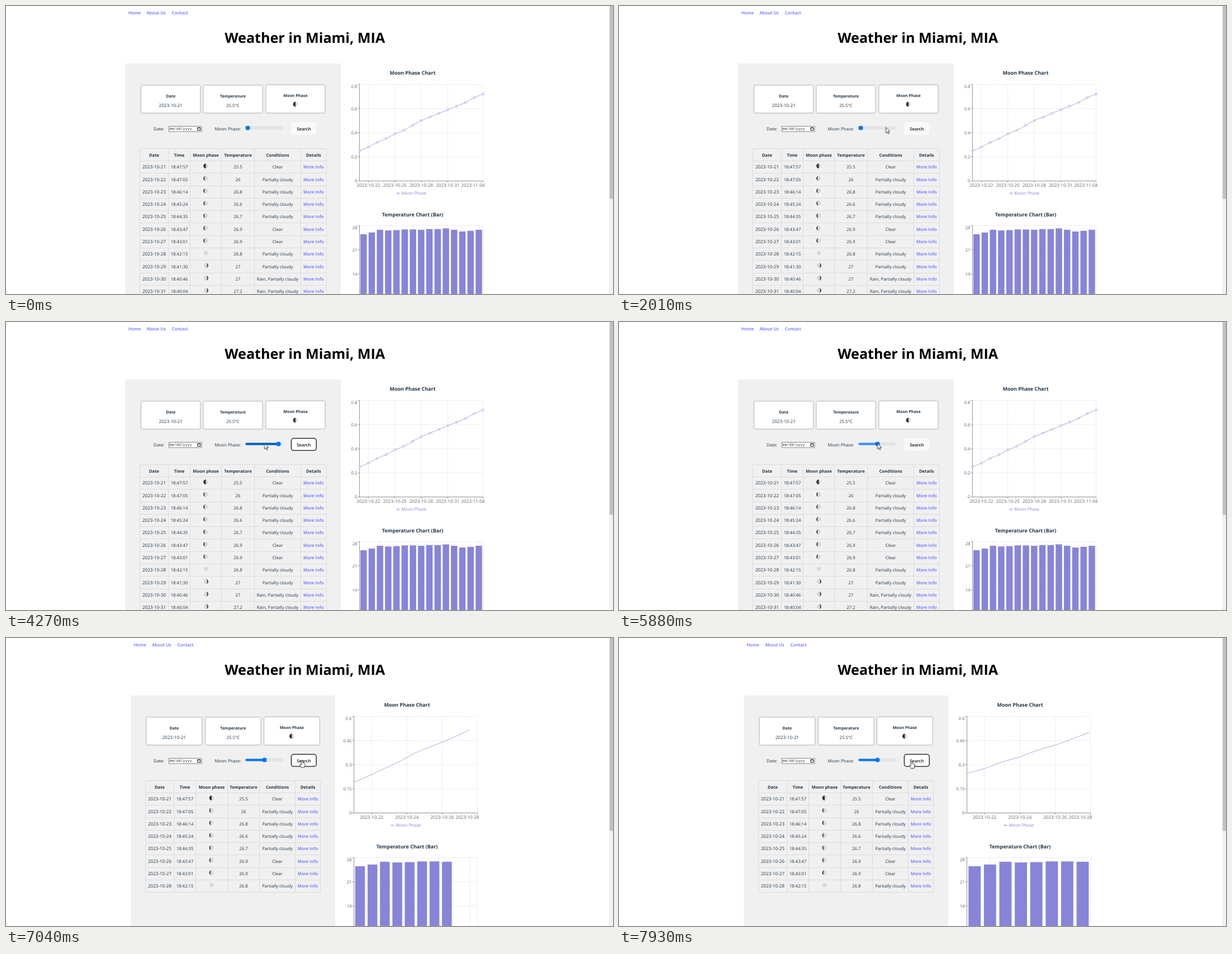
Animation, 1086 px wide and 516 px high, one loop 8 s. Source, as an HTML page:

```html
<!DOCTYPE html>
<html lang="en">
<head>
<meta charset="utf-8">
<title>Weather dashboard</title>
<style>
html, body { margin: 0; width: 100%; height: 100%; overflow: hidden; background: #fff; }
svg { display: block; width: 1086px; height: 516px; }
text { font: 7.75px "Open Sans", "Noto Sans", sans-serif; fill: #213547; text-anchor: middle; text-rendering: geometricPrecision; }
.l { text-anchor: start; }
.r { text-anchor: end; }
.h1 { font-size: 25.15px; font-weight: 700; fill: #000; }
.link { font-size: 7.8px; font-weight: 600; fill: #646cff; }
.th { font-size: 7.65px; font-weight: 700; }
.date { font-size: 8.1px; }
.card { font-size: 7.15px; font-weight: 700; }
.title { font-size: 9px; font-weight: 700; }
.tick { fill: #666; }
.legend { fill: #8884d8; }
.btn { font-size: 7.7px; font-weight: 600; fill: #111; }
.mono { font: 6.7px "Liberation Mono", monospace; fill: #333; }
.box { fill: #fff; stroke: #cfcfcf; stroke-width: .6; filter: drop-shadow(0 0 1.2px rgba(0, 0, 0, .4)); }
.cell { stroke: #dcdcdc; shape-rendering: crispEdges; }
.grid { stroke: #ccc; stroke-width: .7; stroke-dasharray: 1.7; }
.axis { stroke: #666; stroke-width: .7; }
.line { fill: none; stroke: #8884d8; stroke-width: .7; }
.dot { fill: #fff; stroke: #8884d8; stroke-width: .7; }
.bar { fill: #8884d8; }

.step { animation: 8s step-end infinite; }
#before { animation-name: before; }
#after { animation-name: after; }
#fill { animation-name: fill; }
#thumb { animation-name: thumb; }
#hover { animation-name: hover; }
#focus { animation-name: focus; }
#arrow { animation-name: arrow; }
#hand { animation-name: hand; }
#cursor { animation: move 8s linear infinite; }

@keyframes before { 0% { visibility: visible } 86%, 100% { visibility: hidden } }
@keyframes after { 0% { visibility: hidden } 86%, 100% { visibility: visible } }
@keyframes fill {
  0% { width: 4px; fill: #0f7bdd }
  28.625% { width: 59.5px; fill: #3793ff }
  31% { width: 59.5px; fill: #0060c8 }
  32% { width: 59.5px; fill: #0075ff }
  44% { width: 59.5px; fill: #0060c8 }
  73.5% { width: 34.5px; fill: #3793ff }
  75.25% { width: 34.5px; fill: #0060c8 }
  78.4%, 100% { width: 34.5px; fill: #0075ff }
}
@keyframes thumb {
  0% { transform: none; fill: #0f7bdd }
  28.625% { transform: translateX(55px); fill: #0075ff }
  73.5%, 100% { transform: translateX(30px); fill: #0075ff }
}
@keyframes hover {
  0% { opacity: 0 } 37% { opacity: 1 } 38.9% { opacity: 0 }
  79.25% { opacity: 1 } 85.375%, 100% { opacity: 0 }
}
@keyframes focus {
  0% { opacity: 0 } 38.9% { opacity: 1 } 73.5% { opacity: 0 }
  85.375%, 100% { opacity: 1 }
}
@keyframes arrow { 0% { opacity: 1 } 37% { opacity: 0 } 42% { opacity: 1 } 79.25%, 100% { opacity: 0 } }
@keyframes hand { 0% { opacity: 0 } 37% { opacity: 1 } 42% { opacity: 0 } 79.25%, 100% { opacity: 1 } }
@keyframes move {
  0%, 4.74% { transform: translate(1100px, 560px) }
  4.75% { transform: translate(1040px, 498px) }
  8.25% { transform: translate(310px, 204px) }
  9%, 11.4% { transform: translate(292px, 213px) }
  15%, 18% { transform: translate(367px, 203px) }
  25.125% { transform: translate(477.5px, 217.5px) }
  27.75%, 30% { transform: translate(487px, 217.5px) }
  32.125%, 35.2% { transform: translate(499px, 212px) }
  38%, 41% { transform: translate(516px, 219.5px) }
  45% { transform: translate(471px, 218px) }
  45.875%, 52.4% { transform: translate(469px, 218px) }
  53.375%, 77% { transform: translate(462.5px, 217.5px) }
  81.25% { transform: translate(527px, 219px) }
  83.625%, 95% { transform: translate(529.5px, 219px) }
  99.125%, 100% { transform: translate(523.5px, 220.5px) }
}
</style>
</head>
<body>
<svg viewBox="0 0 1086 516">
  <text class="h1" x="534.7" y="66">Weather in Miami, MIA</text>
  <g id="before" class="step"></g>
  <g id="after" class="step"></g>

  <g id="controls">
    <text class="l" x="264" y="222.6">Date:</text>
    <rect x="291.5" y="215.5" width="58.5" height="9.5" fill="#fff" stroke="#767676" stroke-width=".9"/>
    <text class="mono l" x="292.5" y="222.3">mm/dd/yyyy</text>
    <path d="M342.8 218h5v4.6h-5zM342.8 218.4h5" fill="none" stroke="#111" stroke-width="1"/>
    <text class="l" x="373.5" y="222.6">Moon Phase:</text>
    <rect x="428.5" y="216.8" width="65.3" height="3.4" rx="1.7" fill="#efefef" stroke="#b2b2b2" stroke-width=".6"/>
    <rect id="fill" class="step" x="428.3" y="216.5" width="4" height="4" rx="2"/>
    <circle id="thumb" class="step" cx="432.5" cy="218.5" r="4.1"/>
    <rect x="510" y="208" width="45.5" height="22.5" rx="4.5" fill="#f9f9f9"/>
    <rect id="hover" class="step" x="510.2" y="208.2" width="45" height="22.2" rx="4.3" fill="#f9f9f9" stroke="#646cff" stroke-width=".8"/>
    <rect id="focus" class="step" x="510.4" y="208.4" width="44.8" height="21.8" rx="4.2" fill="#fff" stroke="#101010" stroke-width="1.3"/>
    <text class="btn" x="532.8" y="222.6">Search</text>
  </g>

  <rect x="1079" width="7" height="516" fill="#f1f1f1"/>
  <rect x="1080" width="6" height="345.5" fill="#c1c1c1"/>

  <g id="cursor" fill="#fff" stroke="#111" stroke-width=".8" stroke-linejoin="round">
    <path id="arrow" class="step" d="M0 0V10.2L2.4 8 4 11.8 5.6 11 4 7.4H7.2Z"/>
    <path id="hand" class="step" d="M-1.2 1Q-1.2 0 0 0T1.2 1V4.6L4.4 5.2Q5.4 5.5 5.4 6.6V9Q5.2 11 4.2 13H-1.2Q-2.4 10.5-4 8.4Q-4.4 7-3 7.2L-1.2 8.6Z"/>
  </g>
</svg>
<script>
const PLOT_W = 221, LOOP = 8000, START = 6906;
const UNIT = .52; // stage pixels per page pixel
const MOON = [.25, .28, .32, .35, .39, .42, .46, .5, .53, .56, .59, .62, .65, .69, .72];
const TEMP = [25.5, 26, 26.8, 26.6, 26.7, 26.9, 26.9, 26.8, 27, 27, 27.2, 26.8, 26.3, 26.5, 26.8];
const TIMES = ['47:57', '47:05', '46:14', '45:24', '44:35', '43:47', '43:01', '42:15', '41:30', '40:46', '40:04'];
const CLOUD = 'Partially cloudy', RAIN = 'Rain, ' + CLOUD;
const SKY = ['Clear', CLOUD, CLOUD, CLOUD, CLOUD, 'Clear', 'Clear', CLOUD, CLOUD, RAIN, RAIN];
const HEADS = ['Date', 'Time', 'Moon phase', 'Temperature', 'Conditions', 'Details'];

function add(parent, tag, attrs) {
  const el = document.createElementNS('http://www.w3.org/2000/svg', tag);
  for (const k in attrs) el.setAttribute(k, attrs[k]);
  return parent.appendChild(el);
}
const label = (g, s, x, yMid, cls = '') => {
  add(g, 'text', { x, y: yMid + 2.8, class: cls }).textContent = s;
};
const seg = (g, x1, y1, x2, y2, cls) => add(g, 'line', { x1, y1, x2, y2, class: cls });
const dateOf = i => i < 11 ? `2023-10-${21 + i}` : `2023-11-0${i - 10}`;

function moon(g, x, y, phase) {
  const m = add(g, 'g', { transform: `translate(${x} ${y})` });
  add(m, 'circle', { r: 4.4, fill: '#d8d8d8', stroke: '#fafafa', 'stroke-width': .8 });
  if (phase === 'full') return;
  const inner = phase === 'half' ? 'V-4.4' : 'A2.4 4.4 0 0 1 0 -4.4';
  add(m, 'path', {
    d: 'M0 -4.4A4.4 4.4 0 0 0 0 4.4' + inner, fill: '#333',
    transform: phase === 'waning' ? 'scale(-1 1)' : ''
  });
}
const phaseOf = i => i === 0 ? 'half' : i < 7 ? 'waxing' : i === 7 ? 'full' : 'waning';

// Monotone cubic through points ordered by x
function curve(pts) {
  const n = pts.length - 1, slope = [], tan = [];
  for (let i = 0; i < n; i++) slope[i] = (pts[i + 1][1] - pts[i][1]) / (pts[i + 1][0] - pts[i][0]);
  for (let i = 1; i < n; i++) {
    const a = slope[i - 1], b = slope[i];
    tan[i] = a * b <= 0 ? 0 : Math.sign(a) * Math.min(Math.abs(a), Math.abs(b), Math.abs(a + b) / 4) * 2;
  }
  tan[0] = (3 * slope[0] - tan[1]) / 2;
  tan[n] = (3 * slope[n - 1] - tan[n - 1]) / 2;
  let d = 'M' + pts[0];
  for (let i = 0; i < n; i++) {
    const [x, y] = pts[i], [u, v] = pts[i + 1], h = (u - x) / 3;
    d += `C${x + h},${y + h * tan[i]} ${u - h},${v - h * tan[i + 1]} ${u},${v}`;
  }
  return d;
}

const linePoints = (n, max) => MOON.slice(0, n).map((v, i) => [i * PLOT_W / (n - 1), 313.5 - v / max * 173]);
const barRects = n => TEMP.slice(0, n).map((v, i) => {
  const band = PLOT_W / n, width = Math.floor(band * .8 / UNIT) * UNIT;
  return [band * (i + .1), 393.5 + (28 - v) * 6.18, width];
});

function drawCharts(g, c) {
  const p = add(g, 'g', { transform: `translate(${c.plot} 0)` });
  const step = PLOT_W / (c.n - 1), band = PLOT_W / c.n;
  label(p, 'Moon Phase Chart', 95, 120.5, 'title');
  label(p, 'Temperature Chart (Bar)', 95, 374, 'title');

  for (let k = 0; k < 5; k++) {
    const y = 140.5 + k * 43.25;
    seg(p, 0, y, PLOT_W, y, 'grid');
    seg(p, -3, y, 0, y, 'axis');
    label(p, +(c.max * (1 - k / 4)).toFixed(2), -4, k ? y : 144.3, 'tick r');
  }
  c.ticks.forEach((i, k) => {
    const x = i * step, last = k === c.ticks.length - 1;
    seg(p, x, 140.5, x, 313.5, 'grid');
    seg(p, x, 313.5, x, 316.5, 'axis');
    label(p, dateOf(i), last ? 224 : x, 320.8, 'tick date' + (last ? ' r' : ''));
  });
  seg(p, 0, 140.5, 0, 313.5, 'axis');
  seg(p, 0, 313.5, PLOT_W, 313.5, 'axis');
  seg(p, 65.5, 335.8, 72.5, 335.8, 'line');
  add(p, 'circle', { cx: 69, cy: 335.8, r: 1.3, class: 'dot' });
  label(p, 'Moon Phase', 74.8, 335.5, 'legend l');

  [28, 21, 14].forEach((v, k) => {
    const y = 393.5 + k * 43.25;
    seg(p, 0, y, PLOT_W, y, 'grid');
    seg(p, -3, y, 0, y, 'axis');
    label(p, v, -4, k ? y : 397.5, 'tick r');
  });
  [...c.barTicks.map(i => band * (i + .5)), PLOT_W].forEach(x => seg(p, x, 393.5, x, 516, 'grid'));
  seg(p, 0, 393.5, 0, 516, 'axis');

  const line = add(p, 'path', { class: 'line', d: curve(linePoints(c.n, c.max)) });
  if (c.dots) linePoints(c.n, c.max).forEach(([cx, cy]) => add(p, 'circle', { cx, cy, r: 1.6, class: 'dot' }));
  const bars = barRects(c.n).map(([x, y, width]) => add(p, 'rect', { x, y, width, height: 130, class: 'bar' }));
  return { line, bars };
}

function drawScene(id, c) {
  const g = document.getElementById(id);
  ['Home', 'About Us', 'Contact'].forEach((s, i) => label(g, s, c.nav + [0, 32.7, 78][i], 12.2, 'link l'));
  add(g, 'rect', { x: c.panel[0], y: 103, width: c.panel[1] - c.panel[0], height: 413, fill: '#f0f0f0' });

  ['Date', 'Temperature', 'Moon Phase'].forEach((s, i) => {
    const x = c.cards[i], mid = x + c.cardW / 2, up = i === 2 ? .5 : 0;
    add(g, 'rect', { x, y: 142.3 - up, width: c.cardW, height: 49 + up, rx: 2, class: 'box' });
    label(g, s, mid, 160.8 - up, 'card');
    if (i === 2) moon(g, mid, 176, 'half');
    else label(g, i ? '25.5°C' : dateOf(0), mid, 178, i ? '' : 'date');
  });

  const cols = c.cols, rows = Math.min(c.n, 11), end = 277.4 + rows * 22.3;
  const mid = k => (cols[k] + cols[k + 1]) / 2;
  cols.forEach(x => seg(g, x, 255.5, x, end, 'cell'));
  seg(g, cols[0], 255.5, cols[6], 255.5, 'cell');
  HEADS.forEach((s, k) => label(g, s, mid(k), 266.8, 'th'));
  for (let i = 0; i <= rows; i++) seg(g, cols[0], 277.4 + i * 22.3, cols[6], 277.4 + i * 22.3, 'cell');
  for (let i = 0; i < rows; i++) {
    const y = 288.4 + i * 22.3;
    label(g, dateOf(i), mid(0), y, 'date');
    label(g, '18:' + TIMES[i], mid(1), y);
    moon(g, mid(2), y - 1.8, phaseOf(i));
    label(g, TEMP[i], mid(3), y);
    label(g, SKY[i], mid(4), y);
    label(g, 'More Info', mid(5), y, 'link');
  }
  return drawCharts(g, c);
}

drawScene('before', {
  n: 15, max: .8, dots: true, nav: 218.7, panel: [213, 599],
  cards: [242, 353.3, 465.3], cardW: 105.3,
  cols: [239.5, 290.5, 329.5, 385.5, 444.5, 527.5, 573],
  plot: 632.5, ticks: [1, 4, 7, 10, 14], barTicks: [2, 6, 10, 14]
});
const chart = drawScene('after', {
  n: 8, max: .6, dots: false, nav: 228.5, panel: [223.5, 589],
  cards: [251.5, 357, 462], cardW: 98.7,
  cols: [249.5, 300.5, 339.5, 396.5, 453.5, 517.5, 562.5],
  plot: 622.5, ticks: [1, 3, 5, 7], barTicks: [1, 3, 5, 7]
});

// CSS "ease" timing curve
function ease(x) {
  x = Math.min(1, Math.max(0, x));
  const bez = (a, b, s) => 3 * a * s * (1 - s) ** 2 + 3 * b * s * s * (1 - s) + s ** 3;
  let lo = 0, hi = 1;
  for (let i = 0; i < 24; i++) {
    const s = (lo + hi) / 2;
    if (bez(.25, .25, s) < x) lo = s; else hi = s;
  }
  return bez(.1, 1, lo);
}
const mix = (a, b, p) => a.map((v, k) => v + (b[k] - v) * p);

const oldLine = linePoints(15, .8), newLine = linePoints(8, .6);
const oldBars = barRects(15), newBars = barRects(8);

let t0;
function tick(now) {
  t0 ??= now;
  const t = (now - t0) % LOOP - START;
  const p = ease(t / 1500), q = ease(t / 400);
  chart.line.setAttribute('d', curve(newLine.map((b, i) => mix(oldLine[Math.floor(i * 15 / 8)], b, p))));
  chart.bars.forEach((el, i) => {
    const [x, y, w] = mix(oldBars[i], newBars[i], q);
    el.setAttribute('x', x);
    el.setAttribute('y', y);
    el.setAttribute('width', w);
  });
  requestAnimationFrame(tick);
}
requestAnimationFrame(tick);
</script>
</body>
</html>
```
